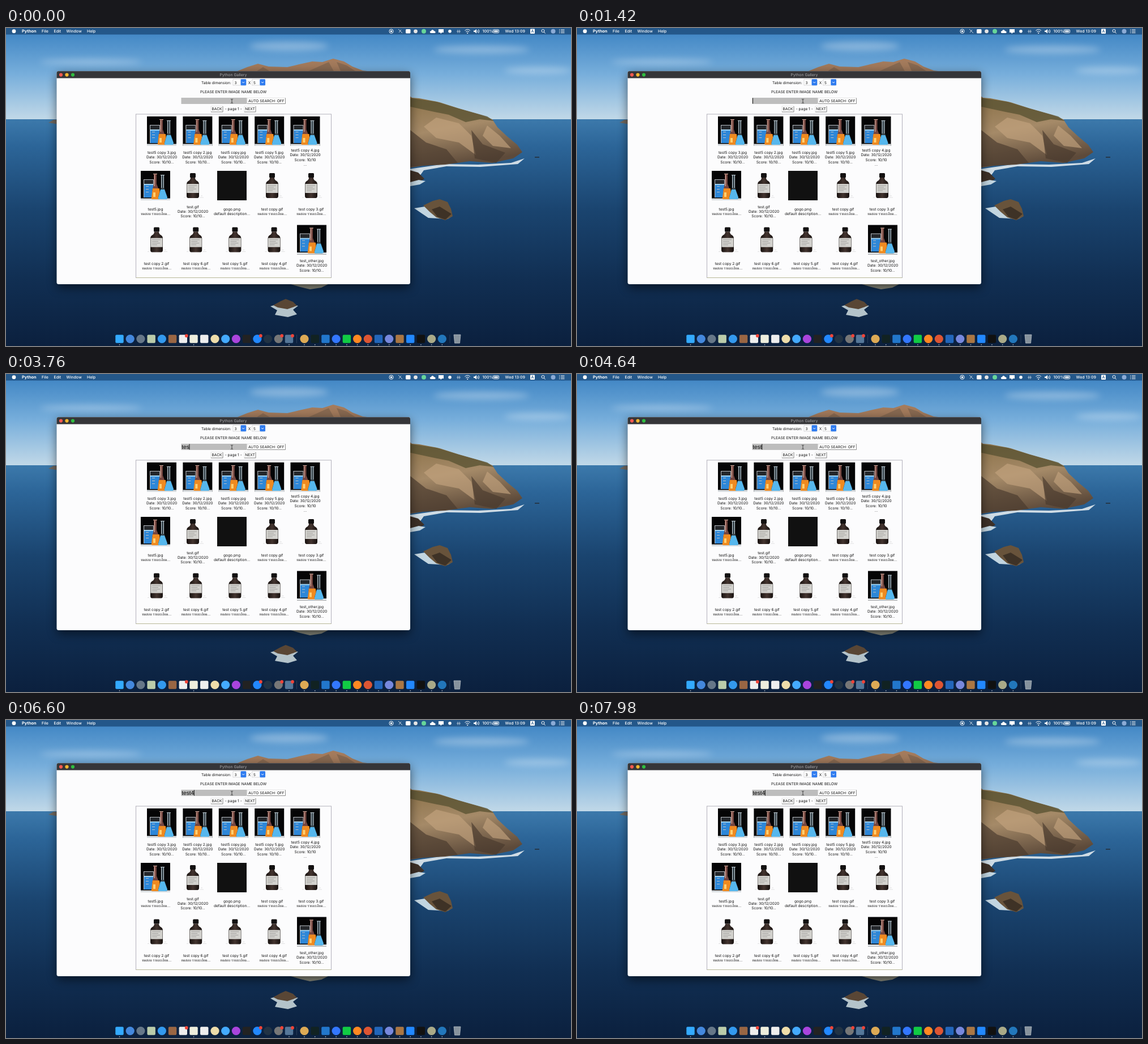
Write an HTML page that moves like this. It is 998x561 px and loops after 8000 ms.

```html
<!DOCTYPE html>
<html lang="en">
<head>
<meta charset="utf-8">
<title>Python Gallery</title>
<style>
  html, body { margin: 0; width: 100%; height: 100%; overflow: hidden; background: #12345a; }
  svg { display: block; width: 100vw; height: 100vh; }
  text { font: 6.6px Inter, "Noto Sans", sans-serif; fill: #111; text-rendering: geometricPrecision; white-space: pre; }
  .mid { text-anchor: middle; }
  .bar text { font-size: 7px; font-weight: 500; fill: #fff; }
  .bar .app { font-weight: 700; font-size: 7.3px; }
  .line { fill: none; stroke: #fff; stroke-width: 1; }
  #typed { font: 10.1px "Liberation Sans", Arial, sans-serif; fill: #000; }
</style>
</head>
<body>
<svg viewBox="0 0 998 561" preserveAspectRatio="none">
  <defs>
    <linearGradient id="sky" x2="0" y2="1">
      <stop stop-color="#3b82c2"/><stop offset=".5" stop-color="#77aedb"/><stop offset="1" stop-color="#c2d9e8"/>
    </linearGradient>
    <linearGradient id="sea" x2="0" y2="1">
      <stop stop-color="#3c79ab"/><stop offset=".12" stop-color="#2c6598"/><stop offset=".4" stop-color="#1a446f"/>
      <stop offset=".7" stop-color="#112f53"/><stop offset="1" stop-color="#0b203e"/>
    </linearGradient>
    <linearGradient id="cliff" x2=".3" y2="1">
      <stop stop-color="#8b7148"/><stop offset=".5" stop-color="#a58a68"/><stop offset="1" stop-color="#5d4a3a"/>
    </linearGradient>
    <linearGradient id="hill" x2="0" y2="1">
      <stop stop-color="#a67c5c"/><stop offset="1" stop-color="#8a6b55"/>
    </linearGradient>
    <linearGradient id="body">
      <stop stop-color="#17110f"/><stop offset=".5" stop-color="#43342f"/><stop offset="1" stop-color="#17110f"/>
    </linearGradient>
    <filter id="soft" x="-50%" y="-100%" width="200%" height="300%"><feGaussianBlur stdDeviation="6"/></filter>
    <filter id="shade" x="-10%" y="-10%" width="120%" height="125%"><feGaussianBlur stdDeviation="9"/></filter>

    <g id="flasks">
      <path fill="#050506" d="M0 0h52v52H0z"/>
      <path fill="#d9dde0" d="M0 48.5h52V52H0z"/>
      <path fill="#24272b" d="M5 15h18v32H5z"/>
      <path fill="#2d87d8" d="M6 24h16v23H6z"/>
      <path fill="#9ed4f5" d="M6 23h16v2H6z"/>
      <path fill="#b9bec4" d="M5 15h18v1H5zM5 15h1v32H5zM22 15h1v32h-1zM9 27h5v1H9zM9 32h5v1H9zM9 37h5v1H9z"/>
      <path fill="#754640" d="M23 5h5v18l5 13H20l3-13z"/>
      <path fill="#e0b9a9" d="M22 5h7v1h-7zM24 7h1v20h-1z"/>
      <path fill="#ef8a20" d="M21 31h12l2 16q0 3-3 3H21q-3 0-2-3z"/>
      <path fill="#ffd071" d="M22 38h4v8h-4z"/>
      <path fill="#39464e" d="M36 7h5v22l6 17q0 4-3 4H33q-3 0-2-4l5-17z"/>
      <path fill="#56b7ed" d="M35 33h7l5 14q0 3-3 3H33q-3 0-2-3z"/>
      <path fill="#c7d5dd" d="M35 7h7v1h-7zM36 8h1v22h-1zM40 8h1v22h-1z"/>
    </g>
    <g id="bottle">
      <rect x="-5" y="-22" width="10" height="8" rx="1.5" fill="#131111"/>
      <path fill="url(#body)" d="M-4-14H4Q4-10 8-8Q11-6 11-2V18Q11 22 8 22H-8Q-11 22-11 18V-2Q-11-6-8-8Q-4-10-4-14z"/>
      <path fill="#d3d2ce" d="M-10.5-3h21v16h-21z"/>
      <path stroke="#8e8d8b" stroke-width=".7" d="M-8 0H7M-8 3H3M-8 6H6M-8 9H1"/>
      <path stroke="#d4d4d4" stroke-width=".7" d="M-13 21h-3M13 21h6M14 18h3"/>
    </g>
    <g id="select">
      <rect width="23" height="10.5" fill="#fff" stroke="#c5c5c8" stroke-width=".7"/>
      <rect x="13.5" y="-.2" width="9.7" height="11" rx="1.5" fill="#2f7cf0"/>
      <path class="line" d="M16.3 4.5l2 2 2-2"/>
    </g>
  </defs>

  <!-- Wallpaper -->
  <path fill="url(#sky)" d="M0 0h998v162H0z"/>
  <g fill="#fff" filter="url(#soft)" opacity=".3">
    <ellipse cx="840" cy="38" rx="85" ry="7"/><ellipse cx="500" cy="32" rx="70" ry="8"/>
    <ellipse cx="940" cy="75" rx="60" ry="6"/><ellipse cx="150" cy="60" rx="90" ry="5"/>
  </g>
  <path fill="url(#sea)" d="M0 161h998v400H0z"/>
  <path fill="#71685f" d="M75 167l9-5h10v8z"/>
  <path fill="url(#hill)" d="M404 78l22-9 19-6 19 5 33 1 21-5 23-5 18 1 19-6 19 5 15 9 18 7 25 3 65 47H404z"/>
  <path fill="#6f5946" opacity=".5" d="M440 78l14-9 15 9zM530 78l40-18 10 18zM584 60l18 6 18 12h-28z"/>
  <path fill="#cfdce5" d="M704 250l70-10 60 1 58-3 24-8-12 10-66 5-60-1-40 7-18 25-16 5z"/>
  <path fill="url(#cliff)" d="M704 122l26 2 36 7 34 11 38 11 21 8 9 14 17 16 18 15 9 13-16 11-37 8-40-3-43 6-40 2-32 5z"/>
  <path fill="#5c5434" opacity=".8" d="M710 123l50 7 40 12 50 14 12 8-25-3-25 5-30-13-30-6-42-9z"/>
  <path fill="#c3a37f" opacity=".65" d="M760 158l40 10 22 22 8 34-30-22-40-8-22-20zM850 172l22 18 20 22-32-4-18-18z"/>
  <path fill="#49392d" opacity=".65" d="M714 180l28 22 36 12 20 24-84 7zM822 180l20 25 40 15-16 18-38-8z"/>
  <path fill="#3d3027" d="M714 251l14 4 11 11-13 8-12 2z"/>
  <path fill="#c2d5e0" d="M714 272l15-4 12 2-10 6-17 3zM721 318l19-3 14 10 34 7-8 5-34-2z"/>
  <path fill="#68533b" d="M737 313l17-8 12-3 14 5 6 12 3 13-13 7-16-5-12-10z"/>
  <path fill="#31271f" opacity=".75" d="M752 320l14-5 21 13-11 10-14-5z"/>
  <path fill="#25394c" d="M934 227h8v2h-8z"/>
  <path fill="#b4c3ca" d="M467 491l16-5 33 4-9 7 7 8-16 5-23-4 4-8z"/>
  <path fill="#594635" d="M472 489l13-7 9-4 13 5 7 7-17 6-17-3z"/>
  <path fill="#8b8c7e" d="M503 452h66l-12 6-20 3-17-4z"/>

  <!-- Menu bar -->
  <g class="bar">
    <path fill="#245789" d="M0 0h998v11.5H0z"/>
    <circle cx="14" cy="5.7" r="3.4" fill="#fff"/>
    <text class="app" x="28" y="8.3">Python</text>
    <text x="63" y="8.3">File</text><text x="84.5" y="8.3">Edit</text>
    <text x="106.5" y="8.3">Window</text><text x="143" y="8.3">Help</text>
    <circle cx="680.5" cy="5.7" r="3.6" class="line"/><circle cx="680.5" cy="5.7" r="1.7" fill="#fff"/>
    <path class="line" opacity=".75" d="M693 2l7 7M694 8l4-5"/>
    <rect x="706" y="2" width="8.5" height="7.5" rx="1.5" fill="#fff"/>
    <circle cx="723.5" cy="5.8" r="3.4" fill="#e5e5e5"/>
    <circle cx="738" cy="5.8" r="4" fill="#67d69a"/>
    <path fill="#fff" d="M750 9q-3-3 1-4 2-4 5 0 4 1 2 4z"/>
    <path fill="#fff" d="M764 2h9v6h-3l-2 2-1-2h-3z"/>
    <circle cx="784" cy="5.8" r="2.8" fill="#fff"/>
    <path class="line" opacity=".6" d="M796 6h7M798 3v6M801 3v6"/>
    <path class="line" d="M810.5 4.5q4.7-4 9.4 0M812.3 6.8q2.9-2.5 5.8 0"/><circle cx="815.2" cy="8.9" r="1" fill="#fff"/>
    <path fill="#fff" d="M826 4.5h2l3-2.5v7.5l-3-2.5h-2z"/><path class="line" d="M832.5 4q1.5 2 0 4M834.5 2.5q2.5 3 0 6.5"/>
    <text x="841.5" y="8.3">100%</text>
    <rect x="860.5" y="3" width="10" height="5.5" rx="1" class="line"/><path fill="#fff" d="M862 4.5h7V7h-7z"/>
    <text x="881.5" y="8.3">Wed 13:09</text>
    <rect x="926" y="1.5" width="8" height="8.5" rx="1" fill="#fff"/><text x="930" y="8.2" class="mid" style="fill:#245789">A</text>
    <circle cx="948.5" cy="5" r="2.5" class="line"/><path class="line" d="M950.3 7l2.3 2.5"/>
    <circle cx="966.5" cy="5.7" r="4" fill="#8cabd6"/>
    <path class="line" d="M977 3h1.5M980 3h6.5M977 5.7h1.5M980 5.7h6.5M977 8.4h1.5M980 8.4h6.5"/>
  </g>

  <!-- Application window -->
  <rect x="90" y="82" width="624" height="376" rx="4" fill="#000" opacity=".55" filter="url(#shade)"/>
  <rect x="89.5" y="76" width="624.5" height="376" rx="3.5" fill="#fcfcfd"/>
  <path fill="#353538" d="M89.5 88.5V79.5q0-3.5 3.5-3.5h617.500q3.500 0 3.500 3.500v9z"/>
  <path stroke="#5d5d61" stroke-width=".7" d="M92 76.600h619"/>
  <circle cx="97" cy="82.600" r="3.100" fill="#f9594f"/><circle cx="107.500" cy="82.600" r="3.100" fill="#f5b72f"/><circle cx="118" cy="82.600" r="3.100" fill="#2fbe40"/>
  <text x="401.500" y="85" class="mid" style="fill:#a9a9ac;font-size:6.900px">Python Gallery</text>

  <text x="345" y="98.500">Table dimension:</text>
  <use href="#select" x="401" y="90.500"/><text x="403.500" y="98.500">3</text>
  <text x="427.700" y="98.500">X</text>
  <use href="#select" x="434.800" y="90.500"/><text x="437" y="98.500">5</text>
  <text x="401.700" y="115.200" class="mid">PLEASE ENTER IMAGE NAME BELOW</text>
  <path fill="#bdbdbd" d="M309.500 123h116v11h-116z"/>
  <text id="typed" x="310.300" y="132"></text>
  <rect id="caret" y="123.500" width="1" height="10" fill="#111"/>
  <path fill="none" stroke="#222" stroke-width=".8" d="M397 125.500h1.200l.8.800.8-.800h1.200M399 126v6M397 132.500h1.200l.8-.800.8.800h1.200"/>
  <g id="buttons"></g>
  <text x="401.700" y="145.400" class="mid">- page 1 -</text>
  <rect x="229.500" y="152" width="345" height="288.500" fill="none" stroke="#aaa9b4" stroke-width=".9"/>
  <path stroke="#b9b993" stroke-width=".9" d="M229.500 440.500h345"/>
  <g id="gallery"></g>
  <g id="dock"></g>
</svg>
<script>
const el = id => document.getElementById(id);

function add(parent, tag, attrs, text = '') {
  const node = document.createElementNS('http://www.w3.org/2000/svg', tag);
  for (const key in attrs) node.setAttribute(key, attrs[key]);
  node.textContent = text;
  return parent.appendChild(node);
}

function addButton(x, y, width, label) {
  const group = add(el('buttons'), 'g', { transform: `translate(${x} ${y})` });
  add(group, 'rect', { width, height: 10, fill: '#fff', stroke: '#d2d2d2', 'stroke-width': .6 });
  add(group, 'path', { d: `M0 10h${width}V0`, fill: 'none', stroke: '#777', 'stroke-width': .8 });
  add(group, 'text', { x: width / 2, y: 7.300, class: 'mid' }, label);
}
addButton(426, 123.500, 67.500, 'AUTO SEARCH: OFF');
addButton(362, 138, 21, 'BACK');
addButton(421, 138, 20, 'NEXT');

const dated = ['Date: 30/12/2020', 'Score: 10/10...'];
const thai = ['ทดสอบ รายละเอียด...'];

function addTile(kind, cx, top, labelY, lines) {
  const gallery = el('gallery');
  if (kind === 'flasks') add(gallery, 'use', { href: '#flasks', x: cx - 26, y: top });
  if (kind === 'bottle') add(gallery, 'use', { href: '#bottle', x: cx, y: top + 26 });
  if (kind === 'square') add(gallery, 'rect', { x: cx - 26, y: top, width: 52, height: 52, fill: '#111' });
  lines.forEach((line, i) =>
    add(gallery, 'text', { x: cx, y: labelY + i * 8.250, class: 'mid' }, line));
}

['3', '2', '', '5'].forEach((n, i) =>
  addTile('flasks', 275 + i * 63.400, 156, 222, [`test5 copy${n && ' ' + n}.jpg`, ...dated]));
addTile('flasks', 528.500, 156, 218, ['test5 copy 4.jpg', dated[0], 'Score: 10/10', '...']);
addTile('flasks', 264, 252, 322, ['test5.jpg', ...thai]);
addTile('bottle', 330, 252, 317.500, ['test.gif', ...dated]);
addTile('square', 399, 252, 322, ['gogo.png', 'default description...']);
addTile('bottle', 470, 252, 322, ['test copy.gif', ...thai]);
addTile('bottle', 539, 252, 322, ['test copy 3.gif', ...thai]);
[2, 6, 5, 4].forEach((n, i) =>
  addTile('bottle', 266 + i * 69.200, 347.500, 417.500, [`test copy ${n}.gif`, ...thai]));
addTile('flasks', 540, 347.500, 413, ['test_other.jpg', ...dated]);

// Each icon: shape (s/c), colour, then optional "!" for a badge and "." for a running app.
function addIcons(startX, icons) {
  icons.split(' ').forEach((icon, i) => {
    const x = startX + i * 18.720, y = 548.500, fill = icon.slice(1, 5), dock = el('dock');
    if (icon[0] === 's') add(dock, 'rect', { x: x - 7.200, y: y - 7.200, width: 14.400, height: 14.400, rx: 2, fill });
    else add(dock, 'circle', { cx: x, cy: y, r: 7.600, fill });
    if (icon.includes('!')) add(dock, 'circle', { cx: x + 6, cy: y - 5.500, r: 2.900, fill: '#f04438' });
    if (icon.includes('.')) add(dock, 'circle', { cx: x, cy: 558.700, r: .8, fill: '#d8dde3' });
  });
}
addIcons(200.500, 's#3af. c#48d c#678 s#bca c#39e s#964 s#eee! s#eed. s#eee c#eda c#4af c#a4d s#222 c#28f! c#234 c#777! s#579!.');
addIcons(527, 'c#da5. s#122. s#27c. c#37f. s#1c4. c#f82. c#d53. s#26b. c#78d. s#a74. s#28f. s#111. c#aa8. c#27b.');
add(el('dock'), 'path', { d: 'M513.500 541v15M784 541v15', stroke: '#718093', 'stroke-width': .6, opacity: .5 });
add(el('dock'), 'path', { d: 'M791 541h12l-1.500 15h-9z', fill: '#87939d', stroke: '#bdc6cd', 'stroke-width': .7 });

const LOOP = 8000, BLINK = 900, LIT = 600;
const keys = [[-650, ''], [2200, 't'], [2850, 'te'], [3300, 'tes'], [4200, 'test'], [6100, 'test4']];
const typed = el('typed'), caret = el('caret');

function draw() {
  const time = performance.now() % LOOP;
  const [since, text] = keys.filter(key => key[0] <= time).pop();
  if (typed.textContent !== text) typed.textContent = text;
  const width = text ? typed.getComputedTextLength() : 0;
  caret.setAttribute('x', 310 + width);
  caret.setAttribute('opacity', (time - since) % BLINK < LIT ? 1 : 0);
  requestAnimationFrame(draw);
}
draw();
</script>
</body>
</html>
```
